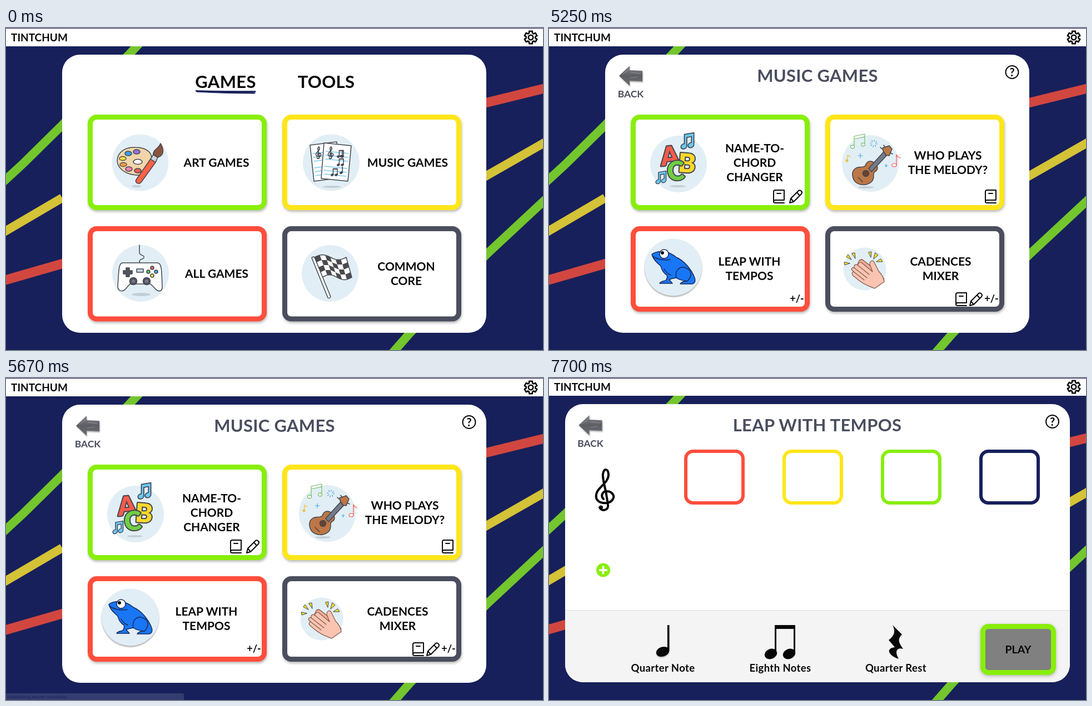
Write an HTML page that moves like this. It is 966 px wide and 580 px high and loops after 8 s.

```html
<!DOCTYPE html>
<html lang="en">
<head>
<meta charset="utf-8">
<title>Music games</title>
<style>
html, body { margin: 0; width: 100%; height: 100%; overflow: hidden; background: #17205a; }
svg { display: block; width: 100vw; height: 100vh; }
text { font: 700 21px Lato, sans-serif; text-anchor: middle; fill: #080808; }
.big { font-size: 31px; letter-spacing: .3px; }
.title { fill: #4a4e5e; }
.back { font-size: 17.5px; fill: #4a4e5e; }
.note-name { font-size: 18.5px; letter-spacing: .4px; }
.small { font-size: 18px; }
.card rect { fill: #fff; stroke-width: 9; filter: drop-shadow(1px 3px 2px #0004); }
.line { fill: none; stroke: #0a0a0a; stroke-width: 2; stroke-linecap: round; stroke-linejoin: round; }
.art { stroke: #424650; stroke-width: 1.5; stroke-linejoin: round; stroke-linecap: round; }
.disc { fill: #e2eef5; stroke: none; }
.shade { fill: #c3ced5; stroke: none; }
.abc { font: 900 47px Lato, sans-serif; stroke: #424650; stroke-width: 4; paint-order: stroke; }

.scene, .page, .status { animation: 8s step-end infinite; }
.scene { animation-name: nudge; }
.home { animation-name: home; }
.music { animation-name: music; }
.rhythm { animation-name: rhythm; }
.status { animation-name: status; }
@keyframes nudge { 0% { transform: none; } 96.25%, 100% { transform: translateY(-1px); } }
@keyframes home { 0% { visibility: visible; } 65.625%, 100% { visibility: hidden; } }
@keyframes music { 0% { visibility: hidden; } 65.625% { visibility: visible; } 91.875%, 100% { visibility: hidden; } }
@keyframes rhythm { 0% { visibility: hidden; } 91.875%, 100% { visibility: visible; } }
@keyframes status { 0% { opacity: 0; } 70% { opacity: 1; } 70.875% { opacity: .5; } 71.75%, 100% { opacity: 0; } }
</style>
</head>
<body>
<svg viewBox="0 0 966 580" preserveAspectRatio="none">
<defs>
  <linearGradient id="stone" x2="0" y2="1">
    <stop stop-color="#85858b"/><stop offset=".5" stop-color="#5d5e64"/><stop offset="1" stop-color="#6c6c72"/>
  </linearGradient>
  <path id="clef" fill="none" d="M98 219C92 213 97 204 104 205C113 205 119 213 115 219C111 227 96 229 88 222C82 216 85 206 91 200C97 193 108 185 107 174C106 164 99 163 97 174C96 182 100 194 103 210L106 229C108 240 94 242 91 234"/>
  <g id="pair">
    <path d="M406 446H443V496H440V453H409V496H406Z"/>
    <ellipse rx="11.5" ry="9" transform="translate(399 498) rotate(-22)"/>
    <ellipse rx="11.5" ry="9" transform="translate(432 498) rotate(-22)"/>
  </g>
  <path id="bold-pair" d="M404 446H443V496A12 11 0 1 1 433 486V461H414V496A12 11 0 1 1 404 486Z"/>
  <g id="single">
    <ellipse rx="12" ry="8.6" transform="translate(204.500 494) rotate(-18)"/>
    <path d="M213 446H216.500V493H213Z"/>
  </g>
  <g id="back">
    <path d="M126 86L145 68V76L168 77V96L145 95V104Z" fill="url(#stone)" style="filter:drop-shadow(1px 2px 1px #0005)"/>
    <path d="M132 84L143 75M147 80L164 82M146 90L160 88" stroke="#a2a2a7" opacity=".6"/>
    <text class="back" x="147" y="125">BACK</text>
  </g>
  <g id="help">
    <circle class="line" cx="833" cy="79.500" r="11.500"/>
    <text x="833" y="86.500" style="font-size:20px">?</text>
  </g>
  <path id="book" class="line" d="M404 312V295Q404 292 407 292H423V310H407Q404 310 404 313Q404 315 407 315H423M410 298H417"/>
  <path id="pencil" class="line" d="M433 315L435 307L449 293Q451 291 454 294Q456 296 454 299L440 313ZM446 296L451 302M435 307L440 313"/>
</defs>

<g class="scene">
  <g fill="none" stroke-width="15.500">
    <path stroke="#73c62d" d="M-8 280L29 246L101 175L221 48L251 16M685 597L727 549L864 408L980 300"/>
    <path stroke="#d4c237" d="M-8 370L101 306M840 280L980 200"/>
    <path stroke="#d24640" stroke-width="17" d="M-8 456L110 422M850 138L980 106"/>
  </g>
  <rect y="1" width="966" height="32" fill="#fff"/>
  <text x="9" y="24" style="font-size:19px;text-anchor:start">TINTCHUM</text>
  <g class="line" style="stroke-width:2.6">
    <path id="gear"/><circle cx="944" cy="17" r="4.200"/>
  </g>

  <g class="page home">
    <rect x="101" y="48" width="763" height="501" rx="32" fill="#fff"/>
    <text class="big" x="395" y="108">GAMES</text>
    <text class="big" x="576" y="108">TOOLS</text>
    <path d="M341 112.500Q390 114 449 113.500V115Q400 116 342 114.500ZM343 115Q400 114 448 116Q449 118 446 118Q390 118 343 115Z" fill="#17205a" stroke="#17205a" stroke-width=".8"/>
    <g class="card">
      <rect x="151.500" y="160.500" width="313" height="163" rx="11.500" stroke="#88ee0a"/>
      <rect x="501.500" y="160.500" width="313" height="163" rx="11.500" stroke="#ffe61a"/>
      <rect x="151.500" y="361.500" width="313" height="162.500" rx="11.500" stroke="#ff4e3c"/>
      <rect x="501.500" y="361.500" width="313" height="162.500" rx="11.500" stroke="#4a4e5e"/>
    </g>
    <text x="378.500" y="250">ART GAMES</text>
    <text x="722.500" y="250">MUSIC GAMES</text>
    <text x="379" y="450">ALL GAMES</text>
    <text x="720" y="437">COMMON</text>
    <text x="720" y="463">CORE</text>

    <g class="art">
      <circle class="disc" cx="241.500" cy="242.500" r="51"/>
      <ellipse class="shade" cx="235" cy="285" rx="9" ry="2"/>
      <path fill="#f0d5aa" d="M200 238C201 222 217 214 233 215C250 215 262 223 262 234C262 242 252 246 254 254C256 262 248 266 235 265C215 264 200 253 200 238Z"/>
      <ellipse cx="237" cy="241" rx="8" ry="4.500" fill="#fff"/>
      <ellipse cx="220" cy="226" rx="6" ry="4" fill="#35a0ea"/>
      <ellipse cx="235" cy="223" rx="6" ry="4" fill="#9472dc"/>
      <ellipse cx="210" cy="235" rx="6" ry="3.500" fill="#ffdd45"/>
      <ellipse cx="211" cy="246" rx="6" ry="3.500" fill="#ffa044"/>
      <ellipse cx="221" cy="254" rx="6" ry="4" fill="#f77fae"/>
      <ellipse cx="237" cy="257" rx="6" ry="4" fill="#f05c4e"/>
      <path fill="#ff6246" d="M260 236L269 242L243 278Q239 282 235 279Q232 276 235 272Z"/>
      <path fill="#c7d4de" d="M260 236L265 228L273 233L269 242Z"/>
      <path fill="#8b543d" d="M265 228C264 219 274 218 278 208C285 220 284 230 273 233Z"/>
    </g>

    <g class="art">
      <circle class="disc" cx="585" cy="242.500" r="51"/>
      <ellipse class="shade" cx="586" cy="286" rx="16" ry="2"/>
      <path fill="#fff" d="M547 211L595 205L601 270L554 276Z"/>
      <path stroke="#7ccbe9" d="M552 226L572 224M553 233L571 231M554 240L570 238M555 252L569 250M556 259L568 257M557 266L568 264"/>
      <path fill="#fff" d="M572 207L621 212L615 276L567 271Z"/>
      <path stroke="#7ccbe9" d="M576 222L616 226M575 229L615 233M575 236L614 240M573 249L613 253M572 256L612 260M572 263L612 267"/>
      <g stroke-width="6">
        <use href="#clef" transform="translate(533 166) scale(.29)"/>
        <use href="#clef" transform="translate(555 166) scale(.29)"/>
      </g>
      <g fill="#424650" stroke-width="3">
        <use href="#pair" transform="translate(510 122) scale(.22)"/>
        <use href="#pair" transform="translate(510 137) scale(.22)"/>
        <use href="#pair" transform="translate(499 155) scale(.22)"/>
        <use href="#single" transform="translate(558 122) scale(.22)"/>
        <use href="#single" transform="translate(558 152) scale(.22)"/>
      </g>
    </g>

    <g class="art">
      <circle class="disc" cx="242" cy="442" r="51"/>
      <ellipse class="shade" cx="243" cy="480" rx="17" ry="3"/>
      <path fill="none" d="M240 391V404C240 411 250 408 248 414C246 418 240 414 240 423"/>
      <path fill="#fff" d="M210 423H272C281 423 280 440 281 466C281 477 272 475 267 468L260 461H223L216 469C210 477 201 474 201 465C203 440 202 423 210 423Z"/>
      <path fill="#50545f" d="M216 432H222V437H227V443H222V448H216V443H211V437H216Z"/>
      <path fill="#c8d7df" d="M235 434H247V440H235Z"/>
      <circle cx="263" cy="432" r="3" fill="#f05c4e"/>
      <circle cx="256" cy="439" r="3" fill="#58c34b"/>
      <circle cx="270" cy="439" r="3" fill="#3da5ef"/>
      <circle cx="263" cy="446" r="3" fill="#ffdf45"/>
      <g fill="#50545f"><circle cx="229" cy="456" r="6.500"/><circle cx="253" cy="456" r="6.500"/></g>
      <g fill="#757a85" stroke="none"><circle cx="229" cy="456" r="3"/><circle cx="253" cy="456" r="3"/></g>
    </g>

    <g class="art">
      <circle class="disc" cx="583" cy="442" r="51"/>
      <path id="cloth" fill="#fff"/>
      <path id="checks" fill="#4b4b4f" stroke="none"/>
      <path fill="#fff" d="M550 414Q552 411 555 413L584 484Q582 488 579 486Z"/>
    </g>
  </g>

  <g class="page music">
    <rect x="101" y="48" width="763" height="501" rx="32" fill="#fff"/>
    <use href="#back"/>
    <use href="#help"/>
    <text class="big title" x="483" y="97">MUSIC GAMES</text>
    <g class="card">
      <rect x="151.500" y="160.500" width="313" height="163" rx="11.500" stroke="#88ee0a"/>
      <rect x="501.500" y="160.500" width="313" height="163" rx="11.500" stroke="#ffe61a"/>
      <rect x="151.500" y="361.500" width="313" height="145" rx="11.500" stroke="#ff4e3c"/>
      <rect x="501.500" y="361.500" width="313" height="145" rx="11.500" stroke="#4a4e5e"/>
    </g>
    <text x="370" y="224">NAME-TO-</text>
    <text x="370" y="250">CHORD</text>
    <text x="370" y="276">CHANGER</text>
    <text x="717.500" y="237">WHO PLAYS</text>
    <text x="717.500" y="263">THE MELODY?</text>
    <text x="360.500" y="428">LEAP WITH</text>
    <text x="360.500" y="454">TEMPOS</text>
    <text x="704.500" y="428">CADENCES</text>
    <text x="704.500" y="454">MIXER</text>
    <use href="#book"/><use href="#pencil"/>
    <use href="#book" x="381"/>
    <use href="#book" x="328" y="185"/><use href="#pencil" x="324" y="185"/>
    <text class="small" x="446" y="494">+/-</text>
    <text class="small" x="796" y="494">+/-</text>

    <g class="art">
      <circle class="disc" cx="233" cy="245" r="51"/>
      <ellipse class="shade" cx="232" cy="285" rx="14" ry="2"/>
      <text class="abc" transform="translate(219 247) rotate(-5)" style="fill:#f45b4b">A</text>
      <text class="abc" transform="translate(247 260) rotate(4)" style="fill:#ffd829">B</text>
      <text class="abc" transform="translate(229 274) rotate(-4)" style="fill:#70cf43">C</text>
      <g fill="#69c8f5" stroke-width="4">
        <use href="#bold-pair" transform="translate(236 193) skewY(-10) scale(.44 .42) translate(-387 -446)"/>
        <use href="#bold-pair" transform="translate(191 261) skewY(-10) scale(.35 .33) translate(-387 -446)"/>
      </g>
    </g>

    <g class="art">
      <circle class="disc" cx="578" cy="244" r="51"/>
      <ellipse class="shade" cx="570" cy="287" rx="14" ry="2"/>
      <path fill="#bd7746" d="M550 254C556 248 563 253 569 248C572 239 579 238 586 243C593 249 592 256 586 259C581 262 587 269 581 276C573 285 557 284 550 276C545 269 544 259 550 254Z"/>
      <circle cx="570" cy="262" r="5.500" fill="#6a412e"/>
      <path fill="#747b88" d="M575 253L603 222L609 228L580 259Z"/>
      <path fill="#bd7746" d="M601 221L600 216L612 212L617 218L612 230L606 229Z"/>
      <path fill="none" d="M556 269L564 277M599 218L596 215M604 214L602 211M614 225L618 227"/>
      <g stroke-width="1.200">
        <path fill="none" stroke="#70bd65" d="M549 213V195L568 191V209M549 200L568 196"/>
        <g fill="#fff" stroke="#70bd65"><ellipse cx="546" cy="214" rx="3.500" ry="2.800"/><ellipse cx="565" cy="210" rx="3.500" ry="2.800"/></g>
        <path fill="none" stroke="#eebc33" d="M537 239V229L542 232"/>
        <circle cx="536" cy="239" r="1.800" fill="#eebc33" stroke="#eebc33"/>
        <path fill="none" stroke="#ed5750" d="M625 247V228Q627 233 632 234"/>
        <ellipse cx="621" cy="247" rx="4" ry="3" fill="#fff" stroke="#ed5750"/>
        <path stroke="#47aee2" d="M556 230H564M560 226V234M604 248H609M606.500 245.500V250.500"/>
      </g>
      <circle cx="584" cy="208" r="5" fill="none" stroke="#47aee2" stroke-width="3.500" stroke-dasharray="1.200 2.725" stroke-linecap="butt"/>
    </g>

    <g class="art">
      <circle class="disc" cx="223.500" cy="431" r="51.500" style="filter:drop-shadow(0 2px 1px #0005)"/>
      <g stroke="#172b60">
        <path fill="#1976f4" d="M185 408C189 404 197 402 207 403C217 404 223 408 229 413C243 419 256 434 262 450C264 456 262 460 258 461H236C238 457 244 456 249 456C240 455 233 453 229 450Q222 451 216 453L222 460H199C201 456 206 456 210 455C212 452 214 449 212 445C204 440 203 434 201 429C195 423 188 418 185 408Z"/>
        <path fill="none" d="M186 411Q200 420 218 417M229 450C226 436 236 428 246 432C257 436 258 447 249 456M207 434Q211 442 219 445"/>
        <circle cx="207" cy="407" r="8" fill="#fff"/>
      </g>
      <circle cx="204" cy="405" r="3" fill="#111" stroke="none"/>
    </g>

    <g class="art">
      <circle class="disc" cx="568" cy="434" r="38.500"/>
      <g stroke="#805848" stroke-width="1.200">
        <path fill="#f3ab97" d="M553 430L558 419Q562 415 566 419L588 436L603 452L589 463Z"/>
        <path fill="#fac4b1" d="M557 424Q560 420 564 424L582 439L577 426C577 419 583 417 585 422L593 438Q602 447 603 457L586 469C578 466 568 463 558 455L547 446Q543 441 548 439L544 435Q545 430 549 432L549 428Q552 425 555 427Z"/>
        <path fill="none" d="M555 427L576 444M549 432L572 450M548 439L567 454"/>
      </g>
      <path fill="#ffe01c" stroke-width="1" d="M531 422L532 427L541 424ZM535 412L538 408L544 417ZM545 406L550 405L551 415ZM575 404L580 403L579 413ZM587 405L592 409L584 416ZM597 416L600 421L589 421Z"/>
    </g>
  </g>

  <g class="page rhythm">
    <rect x="29" y="48" width="908" height="501" rx="32" fill="#fff"/>
    <path d="M29 420H937V517A32 32 0 0 1 905 549H61A32 32 0 0 1 29 517Z" fill="#f4f4f4"/>
    <path d="M29 419.500H937" stroke="#dcdcdc"/>
    <use href="#back" x="-72.500"/>
    <use href="#help" x="72.500"/>
    <text class="big title" x="482.500" y="97">LEAP WITH TEMPOS</text>
    <use href="#clef" stroke="#050505" stroke-width="4" stroke-linecap="round"/>
    <circle cx="93.500" cy="234" r="3.500"/>
    <g fill="#fff" stroke-width="6">
      <rect x="246" y="133" width="103" height="93" rx="13" stroke="#ff4e3c"/>
      <rect x="423" y="133" width="103" height="93" rx="13" stroke="#ffe61a"/>
      <rect x="600" y="133" width="103" height="93" rx="13" stroke="#88ee0a"/>
      <rect x="777" y="133" width="103" height="93" rx="13" stroke="#17205a"/>
    </g>
    <circle cx="97.500" cy="347" r="12.500" fill="#88ee0a"/>
    <path d="M90 347H105M97.500 339.500V354.500" stroke="#fff" stroke-width="3.500"/>
    <g fill="#080808">
      <use href="#single" style="filter:drop-shadow(0 2px 1px #0003)"/>
      <use href="#pair"/>
      <path d="M618 446L635 463C628 470 627 475 637 489C626 486 621 493 629 507C612 502 604 488 622 486L611 473C621 465 624 458 618 446Z"/>
    </g>
    <text class="note-name" x="205" y="529.500">Quarter Note</text>
    <text class="note-name" x="416" y="529.500">Eighth Notes</text>
    <text class="note-name" x="624" y="529.500">Quarter Rest</text>
    <rect x="780.500" y="448.500" width="127" height="83" rx="10" fill="#808080" stroke="#88ee0a" stroke-width="9" style="filter:drop-shadow(0 2px 3px #0004)"/>
    <text x="844" y="496.500" style="font-size:19.500px">PLAY</text>
  </g>
</g>

<g class="status">
  <path d="M0 568H318Q320 568 320 570V580H0Z" fill="#545985"/>
  <text x="2" y="577" style="font:7.800px 'Liberation Sans',sans-serif;text-anchor:start;fill:#202650">Establishing secure connection...</text>
</g>
<rect width="966" height="1" fill="#29205f"/>
</svg>
<script>
const setPath = (id, d) => document.getElementById(id).setAttribute('d', d);
const polygon = points => 'M' + points.map(p => p.map(n => n.toFixed(1))).join('L') + 'Z';

const gearPoints = [];
for (let tooth = 0; tooth < 6; tooth++) {
  for (const [radius, offset] of [[8.4, -21], [11.6, -14], [11.6, 14], [8.4, 21]]) {
    const angle = (tooth * 60 - 90 + offset) * Math.PI / 180;
    gearPoints.push([944 + radius * Math.cos(angle), 17 + radius * Math.sin(angle)]);
  }
}
setPath('gear', polygon(gearPoints));

// Waving cloth: u runs along the flag, v down its height.
const cloth = (u, v) => [
  555 + 57 * u + (14 - 4 * u) * v,
  413 + 36 * v - 4.5 * Math.sin(2 * Math.PI * u)
];
const COLS = 6, ROWS = 4;
const edge = [];
for (let i = 0; i <= 12; i++) edge.push(cloth(i / 12, 0));
for (let i = 12; i >= 0; i--) edge.push(cloth(i / 12, 1));
setPath('cloth', polygon(edge));

let checks = '';
for (let c = 0; c < COLS; c++) {
  for (let r = c % 2; r < ROWS; r += 2) {
    const [u, v, w, h] = [c / COLS, r / ROWS, (c + 1) / COLS, (r + 1) / ROWS];
    checks += polygon([cloth(u, v), cloth(w, v), cloth(w, h), cloth(u, h)]);
  }
}
setPath('checks', checks);
</script>
</body>
</html>
```
